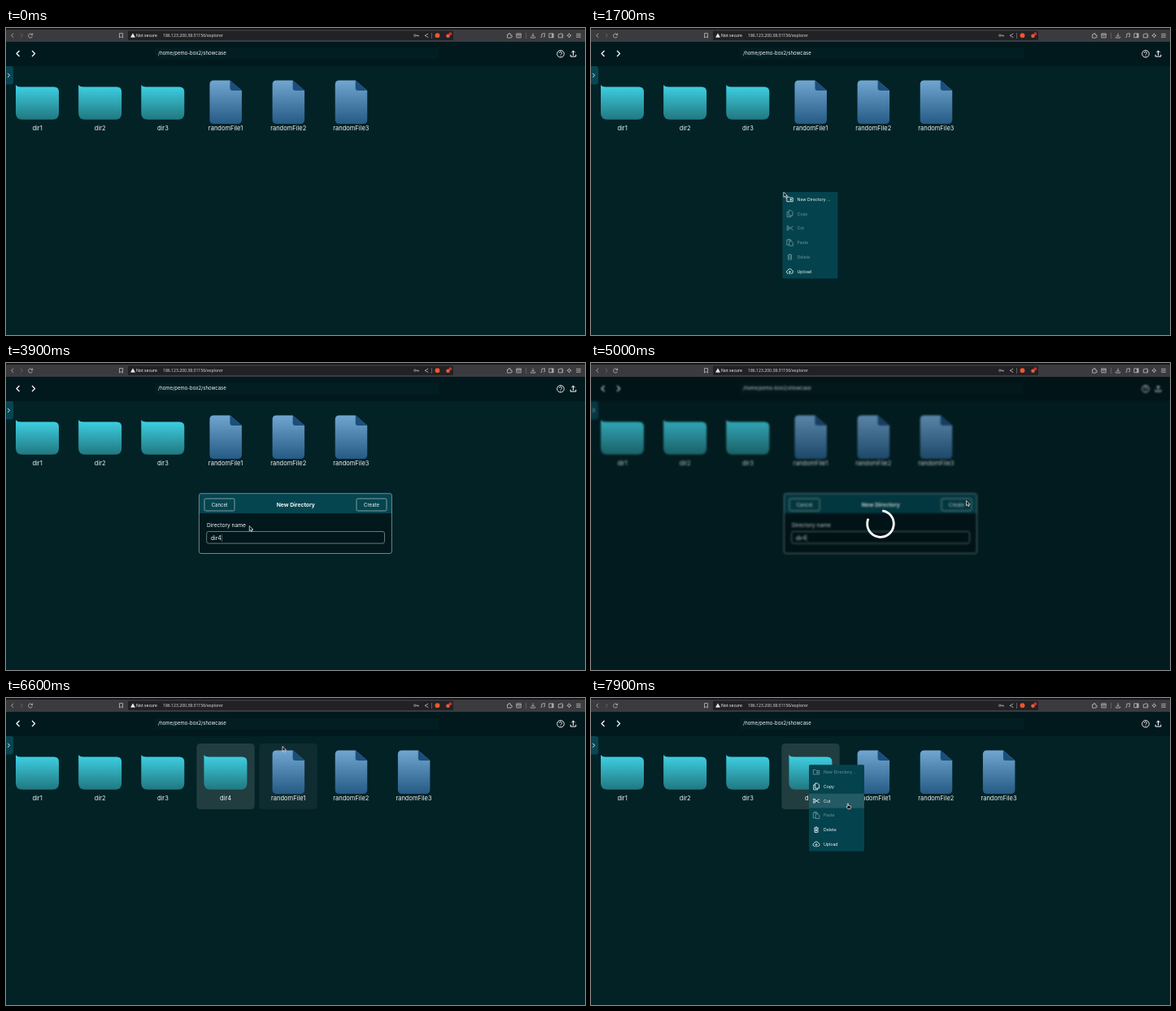
An HTML page for the animation above (8000 ms loop, 712 by 378 pixels).

```html
<!DOCTYPE html>
<html lang="en">
<head>
<meta charset="utf-8">
<title>File explorer</title>
<style>
  html, body { margin: 0; width: 100%; height: 100%; overflow: hidden; background: #022226; }
  svg { display: block; width: 712px; height: 378px; font-family: Inter, sans-serif; }
  .busy { filter: blur(1.3px) brightness(.8); }
</style>
</head>
<body>
<svg viewBox="0 0 712 378">
  <defs>
    <linearGradient id="folder" x2="0" y2="1">
      <stop stop-color="#3fd3e6"/><stop offset="1" stop-color="#217880"/>
    </linearGradient>
    <linearGradient id="file" x2="0" y2="1">
      <stop stop-color="#70a6d0"/><stop offset="1" stop-color="#245a84"/>
    </linearGradient>
    <clipPath id="page"><path d="M0 17H712V378H0z"/></clipPath>
  </defs>
  <g clip-path="url(#page)"><g id="app"></g></g>
  <g id="browser"></g>
  <g id="overlay"></g>
</svg>
<script>
const LOOP = 8000, STEP = 100;
const el = id => document.getElementById(id);

const rect = (x, y, w, h, fill, r = 0, extra = '') =>
  `<rect x="${x}" y="${y}" width="${w}" height="${h}" rx="${r}" fill="${fill}" ${extra}/>`;
const text = (x, y, size, str, extra = '') =>
  `<text x="${x}" y="${y}" font-size="${size}" fill="#f2f6f6" ${extra}>${str}</text>`;
const icon = (x, y, d, color = '#fff', width = 0.8, extra = '') =>
  `<path transform="translate(${x} ${y})" d="${d}" fill="none" stroke="${color}" stroke-width="${width}" stroke-linejoin="round" ${extra}/>`;
const dot = (x, y, r, fill) => `<circle cx="${x}" cy="${y}" r="${r}" fill="${fill}"/>`;
const middle = 'text-anchor="middle"';

const LEFT = 'M2-3.5L-1.5 0L2 3.5', RIGHT = 'M-2-3.5L1.5 0L-2 3.5';
const TRAY = 'M-3.3 1V3.3H3.3V1';

function browserBar() {
  const font = 'font-family="Noto Sans, sans-serif"';
  const grey = '#d0d0d3';
  const tool = (x, d, color = grey) => icon(x, 9.3, d, color, 0.7);
  return rect(0, 0, 712, 17, '#3b3b3f') + rect(0, 0, 712, 2, '#17171a') +
    rect(150, 3.5, 400, 11.5, '#222226', 1.5) +
    tool(8, 'M1.2-2.5L-1.4 0L1.2 2.5') + tool(19, 'M-1.2-2.5L1.4 0L-1.2 2.5', '#77777b') +
    tool(30, 'M2.2-1A2.5 2.5 0 1 0 2.4 1M2.6-2.7V-.8H.6') +
    tool(141.5, 'M-2-2.7H2V2.7L0 1.4L-2 2.7z') +
    icon(156, 9.3, 'M0-2.4L2.4 2H-2.4z', '#eee', 0.6, 'style="fill:#eee"') +
    text(160, 11.1, 5.1, 'Not secure', font) +
    text(193, 11.1, 5.1, '186.123.200.38:31156/explorer', font + ' opacity=".85"') +
    tool(504.5, 'M-.5 0A1.2 1.2 0 1 1-.5-.1H2.8V1.2M1.6 0V1') +
    tool(517, 'M1.8-2L-1.8 0L1.8 2M1.4-2h.8M1.4 2h.8M-2 0h.6') +
    rect(523, 6, .6, 7, '#88888c') + dot(530.5, 9.2, 2.9, '#f0562b') +
    dot(543.5, 9.8, 2.3, '#e0603a') + dot(546.3, 7.2, 1.9, '#d92c2c') +
    tool(619, 'M-2.5-1.3H-.8A1 1 0 1 1 1-1.3H2V.2A1 1 0 1 1 2 2V2.8H-2.5z') +
    tool(630.5, 'M-2.7-2.4H2.7V2.6H-2.7zM-2.7-1H2.7M-1 .7H1') +
    rect(639, 6, .6, 7, '#77777b') +
    tool(648, 'M0-2.8V1M-1.6-.4L0 1.2L1.6-.4M-2.6 1.4V2.8H2.6V1.4') +
    tool(660, 'M-1.2 2V-2L2.4-2.7V1.3M-2.6 2.1h1.2M1 1.4h1.2') +
    tool(670.5, 'M-2.7-2.4H2.7V2.4H-2.7zM1-2.4V2.4M1.8-2.4V2.4') +
    tool(682, 'M-2.7-1.5L1.8-2.5V-1.5H2.7V2.5H-2.7zM1 .5H2.7') +
    tool(692.5, 'M0-2.6L.8-.8L2.6 0L.8.8L0 2.6L-.8.8L-2.6 0L-.8-.8z') +
    tool(704, 'M-2.8-2H2.8M-2.8 0H2.8M-2.8 2H2.8');
}

function pageHeader() {
  return rect(0, 17, 712, 361, '#022226') + rect(0, 17, 712, 30, '#01191d') +
    rect(183, 24.5, 349, 14, '#021e22', 1.5) +
    text(187, 32.7, 6, '/home/pemo-box2/showcase') +
    icon(14.5, 31.5, LEFT, '#fff', 1.2) + icon(34, 31.5, RIGHT, '#fff', 1.2) +
    icon(682, 31.8, 'M4.3 0A4.3 4.3 0 1 1-4.3 0A4.3 4.3 0 1 1 4.3 0M-1.5-1A1.5 1.5 0 1 1 .6.3Q0 .6 0 1.3M0 2v.8', '#fff', 0.9) +
    icon(697.5, 31.8, 'M0 1.8V-3.6M-2.2-1.6L0-3.8L2.2-1.6' + TRAY, '#fff', 1) +
    rect(-4, 47, 13, 22.5, '#064652', 3) + icon(3.3, 58.3, 'M-1.2-2.4L1.2 0L-1.2 2.4', '#fff', 0.9);
}

const cellX = i => 38.6 + 77.15 * i;

function cell(name, i, shade) {
  const x = cellX(i);
  const back = shade ? rect(x - 35.7, 56, 71.4, 81, '#fff', 4.5, `opacity="${shade}"`) : '';
  const art = name.startsWith('dir')
    ? `<path transform="translate(${x - 26.6} 70)" d="M0 0Q1.5 2.5 6 2.5H47Q53 2.5 53 8.5V35Q53 42.7 45.5 42.7H8Q0 42.7 0 35z" fill="url(#folder)"/>`
    : `<g transform="translate(${x - 19.6} 64.6)"><path d="M5 0H25L39.5 12.5V48.5Q39.5 53.5 34.5 53.5H5Q0 53.5 0 48.5V5Q0 0 5 0z" fill="url(#file)"/><path d="M25 0L39.5 12.5H28Q25 12.5 25 9.5z" fill="#1c4e7c"/></g>`;
  return back + art + text(x, 125.6, 7.5, name, middle);
}

const menuItems = [
  ['New Directory ...', 'M-3.7-2.8H-1L0-1.8H3.7V2.8H-3.7zM0 .5H2.6M1.3-.8V1.8'],
  ['Copy', 'M-1.3-4H1.5L3.5-2V2.2H-1.3zM-1.3-2H-3.3V4H1.5V2.2'],
  ['Cut', 'M4-2.3L-1.6 1.2M4 2.3L-1.6-1.2M-1.5-1.6A1.1 1.1 0 1 1-3.7-1.6A1.1 1.1 0 1 1-1.5-1.6M-1.5 1.6A1.1 1.1 0 1 1-3.7 1.6A1.1 1.1 0 1 1-1.5 1.6'],
  ['Paste', 'M-1 3H-3.7V-3.2H1.5V-1.5M-2.2-3.2V-4H0V-3.2M-.8-1.5H2L3.8.2V4H-.8z'],
  ['Delete', 'M-2.6-2.3H2.6M-1-3.2H1M-2-2.3V3.2H2V-2.3M-.6-.8V1.8M.6-.8V1.8'],
  ['Upload', 'M-1.4 2.6H-2.4A1.9 1.9 0 0 1-2.6-1.1A2.7 2.7 0 0 1 2.5-1.3A2 2 0 0 1 2.4 2.6H1.4M0 3.6V-.2M-1.4 1L0-.4L1.4 1']
];
const ROW = 17.75;

function menuHover(menu, p) {
  const row = Math.floor((p.y - menu.y) / ROW);
  return p.x > menu.x + 2 && p.x < menu.x + 68 && menu.active.includes(row) ? row : -1;
}

function drawMenu(menu, hover) {
  return rect(menu.x, menu.y, 68, 6 * ROW, '#04434d', 1.5) + menuItems.map(([label, d], i) => {
    const y = menu.y + ROW * (i + .5);
    const light = i === hover ? rect(menu.x, y - ROW / 2, 68, ROW, '#fff', 0, 'opacity=".12"') : '';
    return light + `<g opacity="${menu.active.includes(i) ? 1 : .45}">` +
      icon(menu.x + 9, y, d, '#fff', 0.8) + text(menu.x + 18, y + 1.9, 5.2, label) + '</g>';
  }).join('');
}

function drawDialog(value) {
  const edge = color => `stroke="${color}" stroke-width=".8"`;
  const button = (x, label) => rect(x, 167, 37, 15, 'none', 1.5, edge('#9fb4b6')) +
    text(x + 18.5, 176.7, 6, label, middle);
  return rect(237.4, 160.7, 237, 73.8, '#01181c', 2.5) +
    `<path d="M237.4 185V163.2Q237.4 160.7 239.9 160.7H471.9Q474.4 160.7 474.4 163.2V185z" fill="#04454f"/>` +
    rect(237.4, 160.7, 237, 73.8, 'none', 2.5, edge('#8fa3a5')) +
    button(244, 'Cancel') + button(431, 'Create') +
    text(356.3, 176.9, 6.75, 'New Directory', middle + ' font-weight="700"') +
    text(247, 201.5, 6.6, 'Directory name') +
    rect(246.7, 207.5, 218.8, 14.6, '#01161a', 2.5, edge('#7d9294')) +
    `<text x="251.7" y="217.6" font-size="7" fill="#f2f6f6">${value}<tspan font-size="7.5" font-weight="200" dx="-.5">|</tspan></text>`;
}

// Pointer stops: time, x, y
const stops = [
  [100, 545, 18], [300, 538, 28], [400, 538, 28], [1000, 254, 227], [1200, 235.5, 202], [1600, 235.5, 202],
  [2100, 249, 203], [2200, 249, 203], [2300, 251, 204], [2600, 251, 204], [2800, 259, 205], [2900, 259, 205],
  [3400, 292, 202], [3800, 292, 202], [4600, 461.5, 169.5], [5700, 461.5, 169.5],
  [6300, 243, 80], [6600, 340, 59.5], [7100, 268, 82], [7400, 268, 82], [7700, 315.5, 130]
];

function pointerAt(t) {
  const i = stops.findIndex(s => s[0] > t);
  if (i < 0) { const [, x, y] = stops.at(-1); return { x, y }; }
  const [t0, x0, y0] = stops[Math.max(0, i - 1)], [t1, x1, y1] = stops[i];
  const u = Math.max(0, (t - t0) / (t1 - t0 || 1)), k = u * u * (3 - 2 * u);
  return { x: x0 + (x1 - x0) * k, y: y0 + (y1 - y0) * k };
}

function drawPointer({ x, y }, hand) {
  const d = hand
    ? 'M0 0Q.9-.7 1 .4V2.4L3.6 3Q4.3 3.3 4 4.4L3.4 6.6H.4L-1.5 4Q-1.2 3-.2 3.8V.4z'
    : 'M0 0V6.2L1.5 4.9L2.5 7.1L3.6 6.6L2.6 4.5H4.6z';
  return icon(x, y, d, '#fff', 0.7, 'style="fill:#0b0b0b"');
}

function drawSpinner(t) {
  const turn = (t - 5000) * .36;
  return `<circle cx="356" cy="198" r="16.3" fill="none" stroke="#fff" stroke-width="2.8" pathLength="360" stroke-dasharray="285 75" transform="rotate(${turn - 82} 356 198)"/>`;
}

function render(t) {
  const p = pointerAt(t), busy = t >= 4900 && t < 5500;
  const dialog = t >= 2500 && t < 5500;
  const menu = t >= 1700 && t < 2500 ? { x: 235.5, y: 202, active: [0, 5] }
    : t >= 7200 ? { x: 268, y: 82.3, active: [1, 2, 4, 5] } : null;
  const dirs = t < 5500 ? 3 : 4;
  const names = [...Array.from({ length: dirs }, (_, i) => 'dir' + (i + 1)),
    ...[1, 2, 3].map(n => 'randomFile' + n)];
  const shade = i => {
    if (i === 3 && t >= 6300) return .12;
    const over = Math.abs(p.x - cellX(i)) < 35.7 && p.y > 56 && p.y < 137;
    return over && !menu && !dialog ? .05 : 0;
  };
  const hover = menu ? menuHover(menu, p) : -1;
  const typed = 'dir4'.slice(0, Math.max(0, (t - 3000) / 100));

  el('app').setAttribute('class', busy ? 'busy' : '');
  el('app').innerHTML = pageHeader() + names.map((n, i) => cell(n, i, shade(i))).join('') +
    (menu ? drawMenu(menu, hover) : '') + (dialog ? drawDialog(typed) : '');
  el('overlay').innerHTML = (busy ? drawSpinner(t) : '') + (t >= 200 ? drawPointer(p, hover >= 0) : '');
}

el('browser').innerHTML = browserBar();
const start = performance.now();
let shown = -1;
function tick() {
  const t = Math.floor((performance.now() - start) % LOOP / STEP) * STEP;
  if (t !== shown) render(shown = t);
  requestAnimationFrame(tick);
}
tick();
</script>
</body>
</html>
```
